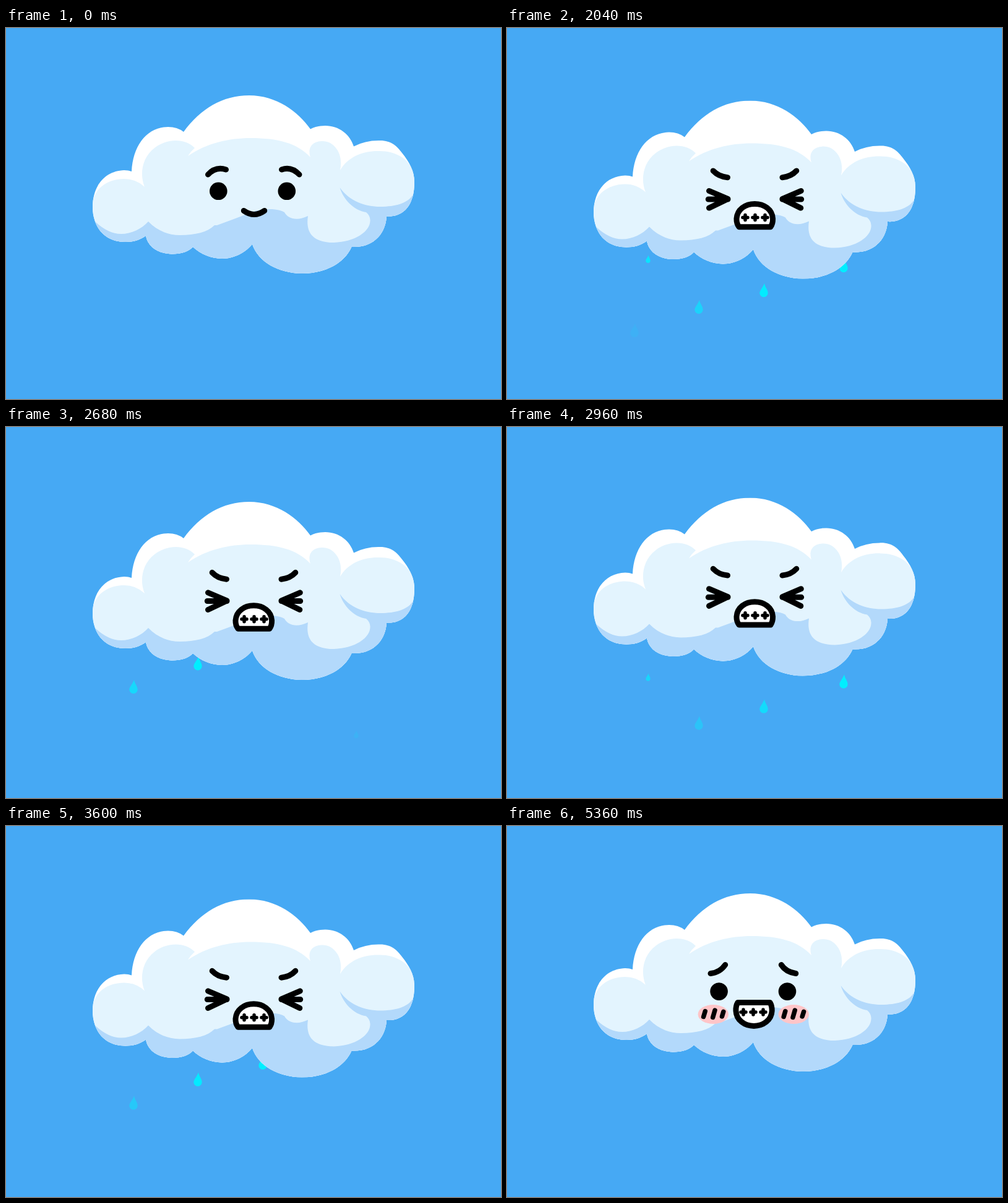
Animation of 800 by 600 pixels, one loop 6 s. Source, as an HTML page:

```html
<!DOCTYPE html>
<html lang="en">
<head>
<meta charset="utf-8">
<title>Straining cloud</title>
<style>
  html, body { margin: 0; width: 100%; height: 100%; overflow: hidden; background: #46a9f4; }
  svg { display: block; width: 800px; height: 600px; }
  .line { fill: none; stroke: #000; stroke-width: 9; stroke-linecap: round; stroke-linejoin: round; }
  .mouth { fill: #fff; stroke: #000; stroke-width: 9; stroke-linejoin: round; }
  .plus { stroke-width: 5.5; }
  .dash { stroke-width: 7.5; }
</style>
</head>
<body>
<svg viewBox="0 0 800 600">
  <defs>
    <clipPath id="outline">
      <path d="M140 290 C140 255 160 231 191 230 Q198 230 203 232 C205 190 228 160 262 160 Q277 160 287 168
        C315 130 350 109 393 109 C437 109 472 135 492 163.5 Q502 158 516 158 C538 158 556 172 562 191.5
        Q580 182 602 182 C622 181 632 191 640 202 C652 217 660 231 660 249 C660 262 658 272 655 279
        C650 293 637 306 615 304.5 C614 330 596 356 558.5 354 C546 382 514 397 478 397
        C440 396 408 379 398 349.5 C388 362 370 373 349 373 C331 372.5 315 366 302 354
        C296 361 284 365.5 268 365.5 C246 365 229 354 226 336 C216 343 206 346 193 346
        C170 346 152 335 144 313 Q140 302 140 290Z"/>
    </clipPath>
    <path id="drop" fill="#00eeff" d="M1 -11.5 C2 -5 6.7 -1 6.7 4.3 A6.7 6.7 0 0 1 -6.7 4.3 C-6.7 0 -1 -5 1 -11.5Z"/>
    <path id="teeth" class="line plus" d="M-20 0h8M-16 -4v8M-4 0h8M0 -4v8M12 0h8M16 -4v8"/>
  </defs>

  <rect width="800" height="600" fill="#46a9f4"/>
  <g id="rain"></g>

  <g id="cloud">
    <g clip-path="url(#outline)">
      <rect x="130" y="100" width="540" height="310" fill="#fff"/>
      <path fill="#e3f4fe" d="M130 410 V290 L143 272 C150 254 170 244 191 244 Q210 244 224 257
        C216 238 219 210 240 194 C260 178 290 178 305 194 Q298 200 294 207
        C325 186 360 178 395 178 C440 178 470 186 492 209 C488 198 491 183 512 183
        C530 183 546 203 540 230 C553 207 580 198 604 199 C630 199 650 212 656 228 L670 250 V410Z"/>
      <path fill="#b3d9fb" d="M130 410 V298 L145 314 C158 326 172 333 186 333 C203 333 219 325 230 313
        C245 328 262 335 281 335 C306 335 326 330 337 319 L341 319 Q363 311 384 303 Q405 292 430 293
        Q444 294 450 298 C455 308 470 313 488 304 C485 325 490 347 530 347 C565 346 590 328 588.5 310
        Q588 303 582 298 C562 295 545 277 539.5 258 C555 280 580 289 605 289
        C630 289 648 283 656 272 L670 255 V410Z"/>
    </g>
  </g>

  <g id="calm">
    <g id="calmEyes">
      <path class="line" d="M326.5 237 Q339 223.5 355.5 229 M445.5 229 Q461 223.5 474 237"/>
      <circle cx="343.3" cy="263.8" r="14.3"/>
      <circle cx="453.8" cy="263.8" r="14.3"/>
    </g>
    <path class="line" d="M384.3 295.5 Q401 307.5 417.7 295.5"/>
  </g>

  <g id="strain">
    <path class="line" d="M333.2 221.5 Q342 231 356.5 232.3 M467.8 221.5 Q459 231 445 232.3"/>
    <path class="line" d="M326.5 254 L357 267 L326.5 281.7 M325.3 267.6 H357 M475.3 254 L445 267 L474.8 281.7 M475.7 267.6 H445"/>
    <path class="mouth" d="M375 312.3 Q370.8 307 371 299 C372 284 385 275 400.3 275
      S428.7 284 429.6 299 Q429.8 307 426 312.3Z"/>
    <use href="#teeth" x="401" y="297"/>
  </g>

  <g id="shy">
    <g id="blush">
      <ellipse cx="333.3" cy="304.5" rx="24.7" ry="15.5" fill="#ffc5c8"/>
      <ellipse cx="463.3" cy="304.5" rx="24.7" ry="15.5" fill="#ffc5c8"/>
      <path class="line dash" d="M320.3 299.5 L317.6 308.5 M336 298 L332.7 309.5 M349.8 300.3 L347.5 308
        M449.8 299.5 L447.2 308.5 M465.3 298 L462 309.5 M479.6 300.3 L477.2 308"/>
    </g>
    <g id="shyEyes">
      <path class="line" d="M329 238.5 Q344 237 352.7 224.5 M443.3 224.5 Q450.5 236 466.8 238.5"/>
      <circle cx="342.6" cy="267.6" r="14.3"/>
      <circle cx="453" cy="267.6" r="14.3"/>
    </g>
    <path class="mouth" d="M373 285.4 H425 Q428.4 291 428.2 299 C427.5 314 414 323.4 399 323.4
      S370.7 314 370 299 Q369.6 291 373 285.4Z"/>
    <use href="#teeth" x="398" y="301"/>
  </g>
</svg>

<script>
  const LOOP = 6000, STEP = 40, STRAIN = 1560, SHY = 4080, FALL = 840;
  const el = id => document.getElementById(id);
  const show = (node, on) => node.setAttribute('visibility', on ? 'visible' : 'hidden');
  const move = (node, y) => node.setAttribute('transform', `translate(0 ${y.toFixed(2)})`);
  const clamp = v => Math.max(0, Math.min(1, v));

  const [rain, cloud, calm, calmEyes, strain, shy, shyEyes, blush] =
    ['rain', 'cloud', 'calm', 'calmEyes', 'strain', 'shy', 'shyEyes', 'blush'].map(el);

  // x, start y, delay in ms, scale, speed in px per ms
  const drops = [
    [206, 324, 0, 1, 0.344], [310, 345, 171, 1, 0.344],
    [415, 360, 293, 1, 0.344], [544, 368, 433, 1, 0.344],
    [228, 290, 262, 0.55, 0.385], [332, 302, 411, 0.55, 0.385],
    [437, 317, 534, 0.55, 0.385], [566, 315, 647, 0.55, 0.385]
  ].map(([x, y, delay, size, speed]) => {
    const node = document.createElementNS('http://www.w3.org/2000/svg', 'use');
    node.setAttribute('href', '#drop');
    rain.append(node);
    return { node, x, y, delay, size, speed };
  });

  // Each push drops the cloud quickly, then lets it rise again.
  const push = [[0, 0], [80, 25], [320, 12], [480, 8.6], [800, 0]];
  function sink(t) {
    if (t < 0 || t >= 2400) return 0;
    t %= 800;
    const i = push.findIndex(p => p[0] > t);
    const [t0, y0] = push[i - 1], [t1, y1] = push[i];
    return y0 + (y1 - y0) * (t - t0) / (t1 - t0);
  }

  function squash(node, on, mid) {
    const s = on ? 0.2 : 1;
    node.setAttribute('transform', `translate(0 ${mid * (1 - s)}) scale(1 ${s})`);
  }

  function drawDrop(d, t) {
    const u = t - d.delay, fall = u % FALL;
    const alpha = u < 0 ? 0 : clamp((520 - fall) / 350);
    d.node.setAttribute('opacity', alpha.toFixed(3));
    d.node.setAttribute('transform',
      `translate(${d.x} ${(d.y + d.speed * fall).toFixed(2)}) scale(${d.size})`);
  }

  function draw(t) {
    const s = t - STRAIN, straining = t >= STRAIN && t < SHY;
    show(calm, t < STRAIN);
    show(strain, straining);
    show(shy, t >= SHY);
    show(rain, straining);

    const y = straining ? sink(s) : 0;
    move(cloud, y);
    move(strain, y + 4.2 * clamp(s / (SHY - STRAIN)));
    if (straining) drops.forEach(d => drawDrop(d, s));

    squash(calmEyes, t >= 520 && t < 640, 250);
    const blink = (t >= 4400 && t < 4560) || (t >= 4760 && t < 4960) || (t >= 5160 && t < 5360);
    squash(shyEyes, blink, 251);
    blush.setAttribute('opacity', clamp((t - SHY) / 160));
  }

  const start = performance.now();
  function tick() {
    const t = Math.max(0, performance.now() - start) % LOOP;
    draw(Math.floor(t / STEP) * STEP);
    requestAnimationFrame(tick);
  }
  draw(0);
  requestAnimationFrame(tick);
</script>
</body>
</html>
```
